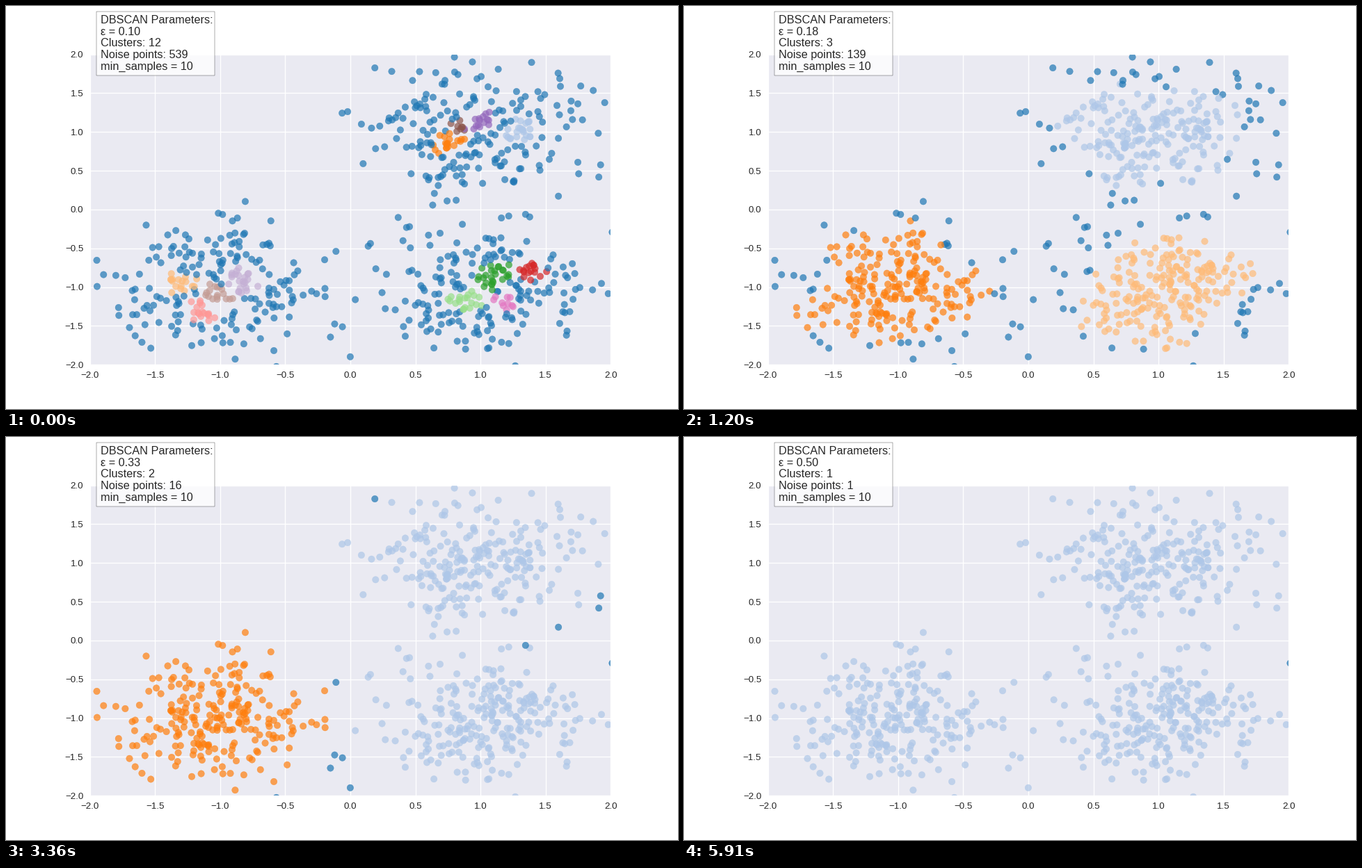
Write a matplotlib script that moves like this. It is 966 by 580 pixels and loops after 6.03 s.

```python
import numpy as np
import matplotlib.pyplot as plt
from matplotlib.animation import FuncAnimation
from matplotlib.patches import Rectangle

W, H, DPI = 966, 580, 96
LOOP, TICK = 6030, 30
STEPS, MIN_SAMPLES = 50, 10
INK = "0.15"
PX = 72 / DPI  # points per pixel

plt.rcParams.update({
    "font.family": "Liberation Sans",
    "text.color": INK,
    "axes.facecolor": "#EAEAF2",
    "axes.linewidth": 0,
    "axes.axisbelow": True,
})


def make_points():
    rng = np.random.RandomState(0)
    centers = [(1, 1), (-1, -1), (1, -1)]
    pts = np.vstack([rng.normal(c, 0.4, (250, 2)) for c in centers])
    order = np.arange(len(pts))
    rng.shuffle(order)
    return pts[order]


def dbscan(dist, eps):
    """Label every point with its cluster number, or -1 for noise."""
    near = dist <= eps
    core = near.sum(axis=1) >= MIN_SAMPLES
    labels = np.full(len(dist), -1)
    cluster = 0
    for i in np.flatnonzero(core):
        if labels[i] != -1:
            continue
        labels[i] = cluster
        front = np.array([i])
        while front.size:
            reached = near[front].any(axis=0) & (labels == -1)
            labels[reached] = cluster
            front = np.flatnonzero(reached & core)
        cluster += 1
    return labels


points = make_points()
dist = np.linalg.norm(points[:, None] - points[None], axis=2)
eps_values = np.linspace(0.1, 0.5, STEPS)
results = [dbscan(dist, e) for e in eps_values]

# Each repeated picture adds 10 ms to the steps after it.
k = np.arange(STEPS)
starts = 120 * k + 10 * ((k > 36) * 1 + (k > 41) + (k > 47))

fig = plt.figure(figsize=(W / DPI, H / DPI), dpi=DPI, facecolor="white")
ax = fig.add_axes([0.125, 0.11, 0.775, 0.77])
ax.set(xlim=(-2, 2), ylim=(-2, 2))
ax.set_xticks(np.arange(-2, 2.1, 0.5))
ax.set_yticks(np.arange(-2, 2.1, 0.5))
ax.grid(color="white", linewidth=1, solid_capstyle="round")
ax.tick_params(length=0, pad=9.4 * PX, labelsize=13.42 * PX, labelcolor=INK)

tab20 = plt.get_cmap("tab20")
dots = ax.scatter(*points.T, s=50.6, alpha=0.7, linewidths=0.3)

box_left, box_top, box_right, box_bottom = 130.4, 7.7, 300, 100.4
ax.add_patch(Rectangle(
    (box_left, H - box_bottom), box_right - box_left, box_bottom - box_top,
    transform=None, clip_on=False, facecolor="white", edgecolor="black",
    alpha=0.8, linewidth=0.3, zorder=3))
lines = [ax.text(135.7, H - 24.7 - 16.8 * i, "", transform=None,
                 fontsize=16.2 * PX, zorder=4) for i in range(5)]


def update(frame):
    step = np.searchsorted(starts, frame * TICK + TICK - 1, side="right") - 1
    labels = results[step]
    dots.set_facecolor(tab20(labels + 1))
    dots.set_edgecolor("face")
    info = ("DBSCAN Parameters:",
            f"ε = {eps_values[step]:.2f}",
            f"Clusters: {labels.max() + 1}",
            f"Noise points: {np.sum(labels == -1)}",
            f"min_samples = {MIN_SAMPLES}")
    for line, text in zip(lines, info):
        line.set_text(text)
    return [dots, *lines]


anim = FuncAnimation(fig, update, frames=LOOP // TICK, interval=TICK,
                     repeat=True, repeat_delay=0, cache_frame_data=False)
plt.show()
```
